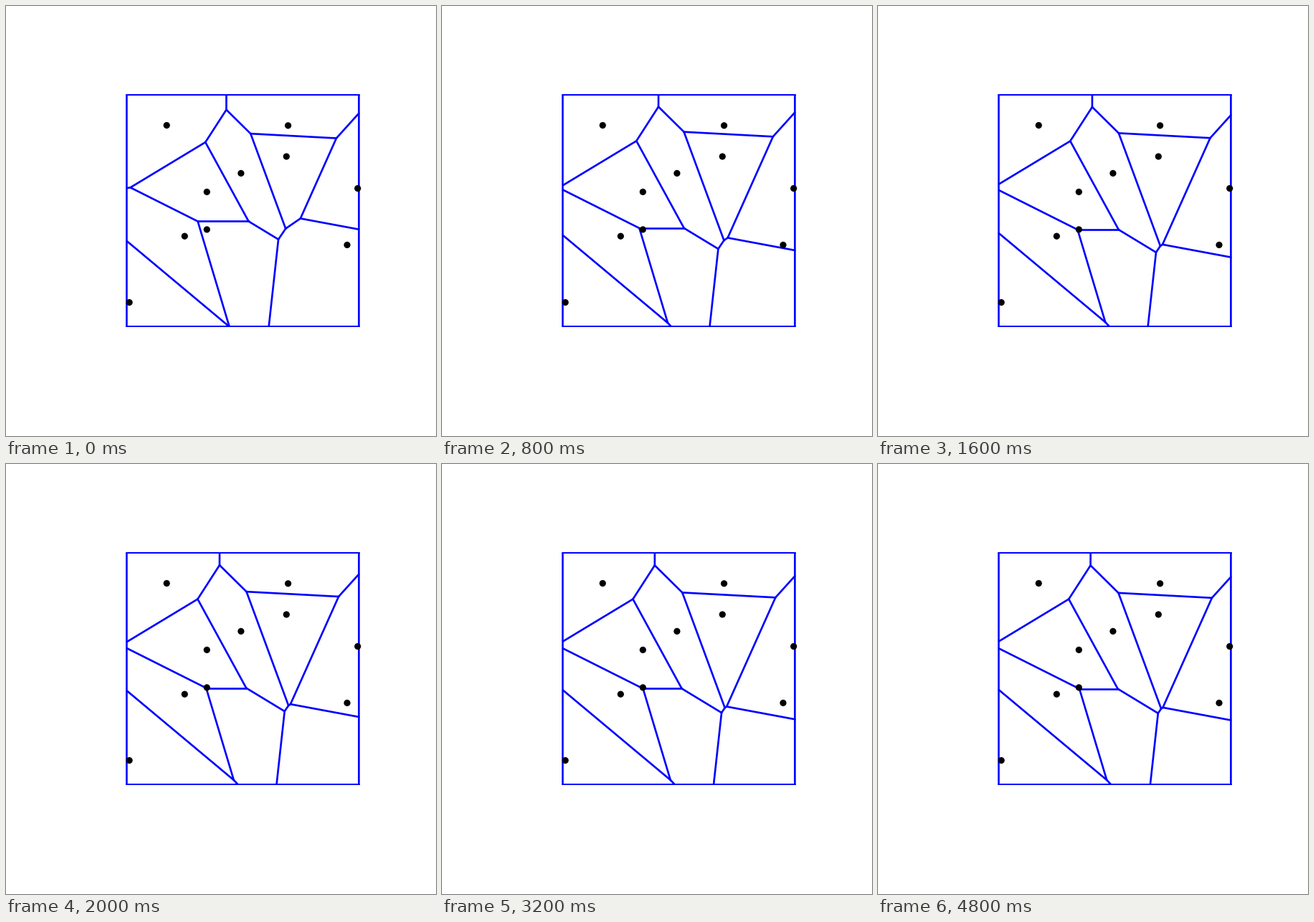
Write a matplotlib script that moves like this. It is 600x600 px and loops after 4.9 s.

```python
import numpy as np
import matplotlib.pyplot as plt
from matplotlib.animation import FuncAnimation
from matplotlib.collections import LineCollection
from matplotlib.patches import Circle, Rectangle

# Semi-discrete optimal transport: the weights of a power diagram follow
# gradient ascent until every cell has the same area.
SIZE, DPI = 600, 100
FRAMES, INTERVAL = 49, 100
FIRST_STEP, STEP = 0.2, 0.1
LINE, DOT = 2.67, 4.6
BLUE = "#0000ff"
LEFT, RIGHT, TOP, BOTTOM = 168.4, 492.4, 124.0, 447.0

SITES = np.array([
    (224.2, 166.5), (393.6, 166.8), (391.3, 210.0), (327.9, 233.4),
    (280.3, 259.4), (490.7, 254.5), (280.3, 311.9), (249.3, 321.2),
    (476.0, 333.4), (172.1, 413.6),
])
BOX = [(LEFT, TOP), (RIGHT, TOP), (RIGHT, BOTTOM), (LEFT, BOTTOM)]
TARGET = (RIGHT - LEFT) * (BOTTOM - TOP) / len(SITES)


def px(n):
    return n * 72 / DPI


def clip(poly, normal, offset):
    """Keep the part of a convex polygon where normal . x <= offset."""
    out = []
    for a, b in zip(poly, poly[1:] + poly[:1]):
        da = np.dot(normal, a) - offset
        db = np.dot(normal, b) - offset
        if da <= 0:
            out.append(a)
        if (da < 0 < db) or (db < 0 < da):
            out.append(a + (b - a) * da / (da - db))
    return out


def power_cells(weights):
    level = (SITES ** 2).sum(axis=1) - weights
    cells = []
    for i, site in enumerate(SITES):
        poly = [np.array(c) for c in BOX]
        for j, other in enumerate(SITES):
            if j != i:
                poly = clip(poly, 2 * (other - site), level[j] - level[i])
        cells.append(poly)
    return cells


def area(poly):
    if len(poly) < 3:
        return 0.0
    x, y = np.array(poly).T
    return abs(np.dot(x, np.roll(y, -1)) - np.dot(y, np.roll(x, -1))) / 2


def on_border(a, b):
    return any(abs(a[k] - v) < 1e-6 and abs(b[k] - v) < 1e-6
               for k, v in ((0, LEFT), (0, RIGHT), (1, TOP), (1, BOTTOM)))


def inner_edges(cells):
    edges = []
    for poly in cells:
        for a, b in zip(poly, poly[1:] + poly[:1]):
            # each shared edge is kept once, from its left or upper end
            if tuple(a) < tuple(b) and not on_border(a, b):
                edges.append((a, b))
    return edges


def ascend():
    weights = np.zeros(len(SITES))
    cells = power_cells(weights)
    states = []
    for k in range(FRAMES):
        step = STEP if k else FIRST_STEP
        weights = weights + step * (TARGET - np.array([area(c) for c in cells]))
        cells = power_cells(weights)
        states.append(inner_edges(cells))
    return states


states = ascend()

fig = plt.figure(figsize=(SIZE / DPI, SIZE / DPI), dpi=DPI, facecolor="white")
ax = fig.add_axes([0, 0, 1, 1])
ax.set(xlim=(0, SIZE), ylim=(SIZE, 0))
ax.axis("off")

edges = LineCollection(states[0], colors=BLUE, linewidths=px(LINE),
                       capstyle="round", zorder=1)
ax.add_collection(edges)
half = LINE / 2
edges.set_clip_path(Rectangle((LEFT - half, TOP - 1), RIGHT - LEFT + LINE,
                              BOTTOM - TOP + 2, transform=ax.transData))

sides = [[(x, TOP - 1), (x, BOTTOM + 1)] for x in (LEFT, RIGHT)]
caps = [[(LEFT - half, y), (RIGHT + half, y)] for y in (TOP, BOTTOM)]
ax.add_collection(LineCollection(
    sides + caps, colors=BLUE, capstyle="butt", zorder=2,
    linewidths=[px(LINE)] * 2 + [px(2)] * 2, snap=False))

for site in SITES:
    ax.add_patch(Circle(site, DOT, color="black", linewidth=0, zorder=3))


def update(i):
    edges.set_segments(states[i])
    return (edges,)


anim = FuncAnimation(fig, update, frames=FRAMES, interval=INTERVAL,
                     repeat=True, repeat_delay=0)
plt.show()
```
